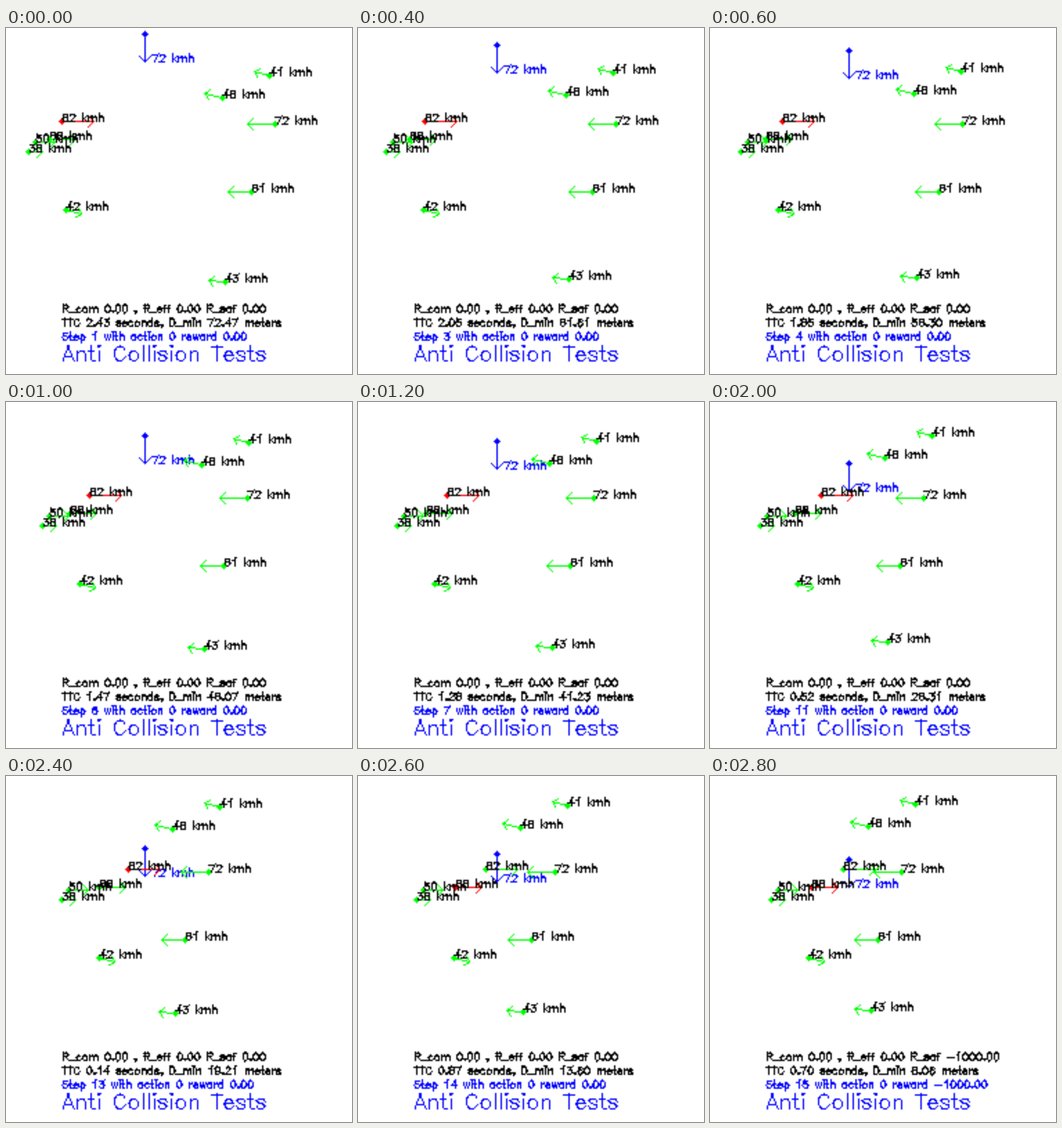
Write a matplotlib script that moves like this. It is 500 by 500 pixels and loops after 3000 ms.

```python
import math

import numpy as np
import matplotlib.pyplot as plt
from matplotlib.animation import FuncAnimation

SIZE = 250            # drawing grid, shown at twice its size
STEPS = 15
DT = 0.2              # seconds per step
RADIUS = 15           # safety distance for the time to collision
CRASH = 10            # distance that counts as a collision

BLACK, BLUE = (0, 0, 0), (0, 0, 255)
RED, GREEN = (255, 0, 0), (0, 255, 0)


# ---- stroke font: x from the left edge, y up from the baseline ----

def line(*v):
    return list(zip(v[::2], v[1::2]))


def arc(cx, cy, rx, ry, start, end):
    n = max(2, round(abs(end - start) / 24))
    angles = np.radians(np.linspace(start, end, n + 1))
    return [(cx + rx * math.cos(a), cy + ry * math.sin(a)) for a in angles]


def oval(cx, cy, rx, ry):
    return arc(cx, cy, rx, ry, 90, 450)


def stem(x, top, bottom=0):
    return line(x, top, x, bottom)


def hump(x):
    return line(x, 10, x + 3, 13, x + 5, 14, x + 8, 14, x + 10, 13, x + 11, 10, x + 11, 0)


BOWL = arc(9.5, 7, 6.5, 7, 35, 325)
BAR = line(2, 14, 9, 14)
SIX = (line(16, 18, 15, 20, 12, 21, 10, 21, 7, 20, 5, 17, 4, 12, 4, 7)
       + arc(10.5, 6.5, 6.5, 6.5, 180, 540))

DIGITS = {
    "0": [oval(10, 10.5, 7, 10.5)],
    "1": [line(6, 17, 8, 18, 11, 21, 11, 0)],
    "2": [arc(10, 15.5, 6, 5.5, 175, -30) + line(3, 0, 17, 0)],
    "3": [line(5, 21, 16, 21, 10, 13, 13, 13) + arc(10, 6.5, 7, 6.5, 65, -155)],
    "4": [line(13, 21, 3, 7, 18, 7), stem(13, 21)],
    "5": [line(15, 21, 5, 21, 4, 12) + arc(10, 7, 7, 7, 130, -155)],
    "6": [SIX],
    "7": [line(3, 21, 17, 21, 7, 0)],
    "8": [oval(10, 16.5, 6, 4.5), oval(10, 6, 7, 6)],
    "9": [[(20 - x, 21 - y) for x, y in SIX]],
}
GLYPHS = {c: (20, strokes) for c, strokes in DIGITS.items()}

GLYPHS.update({
    " ": (16, []),
    ".": (10, [line(5, 2, 4, 1, 5, 0, 6, 1, 5, 2)]),
    ",": (10, [line(6, 1, 5, 0, 4, 1, 5, 2, 6, 1, 6, -1, 5, -3, 4, -4)]),
    "-": (26, [line(4, 9, 22, 9)]),
    "_": (18, [line(1, 0, 17, 0)]),
    "A": (18, [line(1, 0, 9, 21, 17, 0), line(4, 7, 14, 7)]),
    "C": (21, [arc(11, 10.5, 8, 10.5, 30, 330)]),
    "D": (21, [line(4, 21, 11, 21) + arc(11, 10.5, 7, 10.5, 90, -90) + line(4, 0, 4, 21)]),
    "R": (21, [line(4, 0, 4, 21, 13, 21) + arc(13, 16, 5, 5, 90, -90) + line(4, 11),
               line(11, 11, 18, 0)]),
    "S": (20, [arc(10, 16.5, 7, 4.5, 30, 240) + arc(10, 5.5, 7, 5.5, 60, -150)]),
    "T": (16, [stem(8, 21), line(1, 21, 15, 21)]),
})

GLYPHS.update({
    "a": (19, [stem(15, 14), BOWL]),
    "c": (18, [BOWL]),
    "d": (19, [stem(15, 21), BOWL]),
    "e": (18, [line(3, 8, 15, 8) + arc(9.5, 7, 6, 7, 10, 325)]),
    "f": (12, [line(10, 21, 8, 21, 6, 20, 5, 17, 5, 0), BAR]),
    "h": (19, [stem(4, 21), hump(4)]),
    "i": (8, [line(3, 21, 4, 20, 5, 21, 4, 22, 3, 21), stem(4, 14)]),
    "k": (17, [stem(4, 21), line(14, 14, 4, 4), line(8, 8, 15, 0)]),
    "l": (8, [stem(4, 21)]),
    "m": (30, [stem(4, 14), hump(4), hump(15)]),
    "n": (19, [stem(4, 14), hump(4)]),
    "o": (19, [oval(9.5, 7, 6.5, 7)]),
    "p": (19, [stem(4, 14, -7), arc(9.5, 7, 6.5, 7, 145, -145)]),
    "r": (13, [stem(4, 14), line(4, 8, 5, 11, 7, 13, 9, 14, 12, 14)]),
    "s": (17, [arc(8.5, 11, 5.5, 3, 0, 240) + arc(8.5, 3.5, 5.5, 3.5, 70, -180)]),
    "t": (12, [line(5, 21, 5, 4, 6, 1, 8, 0, 10, 0), BAR]),
    "w": (22, [line(3, 14, 7, 0, 11, 14, 15, 0, 19, 14)]),
})


# ---- drawing on the pixel grid ----

def half_up(v):
    return math.floor(v + 0.5)


def draw_line(img, p, q, color):
    m = 0 if abs(q[0] - p[0]) > abs(q[1] - p[1]) else 1
    if p[m] > q[m]:
        p, q = q, p
    span = q[m] - p[m]
    slope = (q[1 - m] - p[1 - m]) / span if span else 0
    for t in range(math.floor(p[m]), math.floor(q[m]) + 1):
        other = half_up(p[1 - m] + (t - p[m]) * slope)
        x, y = (t, other) if m == 0 else (other, t)
        img[y, x] = color
    img[half_up(q[1]), half_up(q[0])] = color


def draw_text(img, text, x, y, color, scale=0.25):
    for c in text:
        width, strokes = GLYPHS[c]
        for stroke in strokes:
            pts = [(x + u * scale, y - v * scale) for u, v in stroke]
            for p, q in zip(pts, pts[1:]):
                draw_line(img, p, q, color)
        x += width * scale


def draw_dot(img, x, y, color, r=2):
    for dy in range(-r, r + 1):
        w = r - abs(dy)
        img[y + dy, x - w:x + w + 1] = color


def draw_arrow(img, p, q, color, head=5):
    draw_line(img, p, q, color)
    back = math.atan2(p[1] - q[1], p[0] - q[0])
    for turn in (-math.pi / 4, math.pi / 4):
        wing = (half_up(q[0] + head * math.cos(back + turn)),
                half_up(q[1] + head * math.sin(back + turn)))
        draw_line(img, wing, q, color)


# ---- traffic ----

class Car:
    def __init__(self, x, y, kmh, heading):
        self.start, self.kmh = (x, y), kmh
        a = math.radians(heading)
        self.vel = (round(kmh / 3.6 * math.cos(a), 6), round(kmh / 3.6 * math.sin(a), 6))

    def at(self, i):
        # each step moves by whole cells
        return tuple(s + i * math.floor(v * DT) for s, v in zip(self.start, self.vel))

    def draw(self, img, i, color, label=BLACK, offset=(0, 0)):
        x, y = self.at(i)
        tip = (half_up(x + self.vel[0]), half_up(y + self.vel[1]))
        draw_dot(img, x, y, color)
        draw_arrow(img, (x, y), tip, color)
        draw_text(img, f"{self.kmh:.0f} kmh", x + offset[0], y + offset[1], label)


EGO = Car(100, 4, 72, 90)
CARS = [
    Car(40, 67, 82.3, 0),
    Car(31, 80, 68, 0),
    Car(21, 82, 50, 0),
    Car(16, 89, 37.6, 0),
    Car(43, 131, 42, 15),
    Car(190, 34, 41, 195),
    Car(156, 50, 48, 195),
    Car(194, 69, 72, 180),
    Car(177, 118, 61, 180),
    Car(158, 183, 43, 185),
]


def gap(car, i):
    (ex, ey), (cx, cy) = EGO.at(i), car.at(i)
    return cx - ex, cy - ey


def time_to_collision(car, i):
    dx, dy = gap(car, i)
    vx, vy = EGO.vel[0] - car.vel[0], EGO.vel[1] - car.vel[1]
    speed = math.hypot(vx, vy)
    miss = (dx * vy - dy * vx) / speed
    if abs(miss) >= RADIUS:
        return math.inf
    t = (dx * vx + dy * vy) / speed ** 2 - math.sqrt(RADIUS ** 2 - miss ** 2) / speed
    return t if t > 0 else math.inf


def render(i):
    img = np.full((SIZE, SIZE, 3), 255, np.uint8)
    threat = min(CARS, key=lambda c: time_to_collision(c, i))
    ttc = time_to_collision(threat, i)
    d_min = min(math.hypot(*gap(c, i)) for c in CARS)
    safety = -1000 if d_min < CRASH else 0

    EGO.draw(img, i, BLUE, BLUE, (5, 20))
    for car in CARS:
        car.draw(img, i, RED if car is threat else GREEN)

    draw_text(img, f"R_com 0.00 , R_eff 0.00 R_saf {safety:.2f}", 40, 205, BLACK)
    draw_text(img, f"TTC {ttc:.2f} seconds, D_min {d_min:.2f} meters", 40, 215, BLACK)
    draw_text(img, f"Step {i + 1} with action 0 reward {safety:.2f}", 40, 225, BLUE)
    draw_text(img, "Anti Collision Tests", 40, 240, BLUE, 0.5)
    return img


fig = plt.figure(figsize=(5, 5), dpi=100, facecolor="white")
ax = fig.add_axes([0, 0, 1, 1])
ax.axis("off")
view = ax.imshow(render(0), interpolation="bilinear")


def update(i):
    view.set_data(render(i))
    return [view]


anim = FuncAnimation(fig, update, frames=STEPS, interval=200, repeat=True, repeat_delay=0)
plt.show()
```
